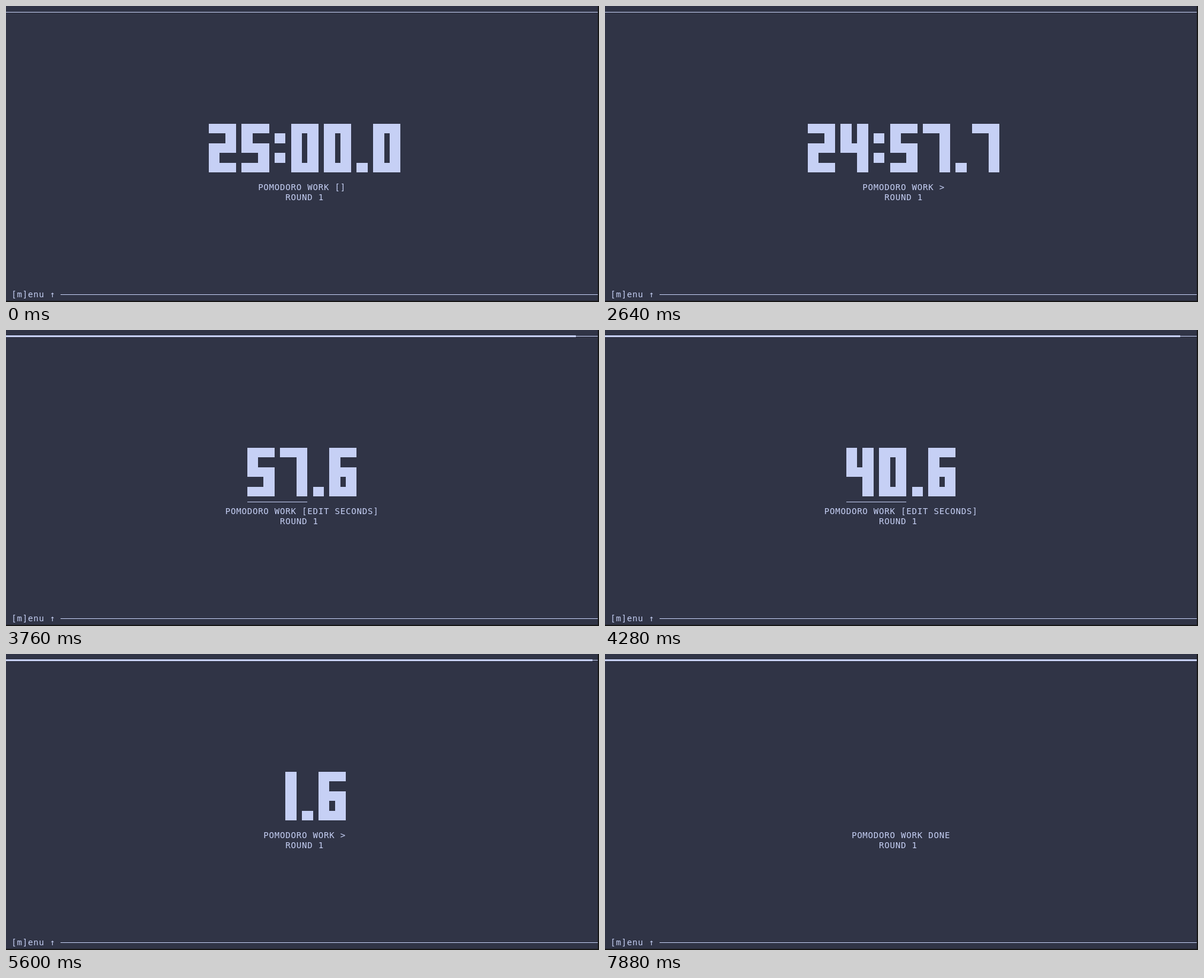
Animation of 1000 by 500 pixels, one loop 8 s. Source, as an HTML page:

```html
<!DOCTYPE html>
<html lang="en">
<head>
<meta charset="utf-8">
<title>Pomodoro timer</title>
<style>
  html, body { margin: 0; width: 100%; height: 100%; overflow: hidden; background: #171717; }
  svg { display: block; width: 100%; height: 100%; fill: #c6d0f5; }
  text { font: 14.1px "DejaVu Sans Mono", monospace; white-space: pre; }
</style>
</head>
<body>
<svg viewBox="0 0 1000 500">
  <rect width="998" height="498" fill="#303446"/>
  <rect y="10" width="998" height="1"/>
  <rect id="bar" y="9" height="3"/>
  <path id="digits" shape-rendering="crispEdges"/>
  <rect id="underline" y="290" height="1"/>
  <text id="status" y="311.3"></text>
  <text id="round" y="327.7"></text>
  <text id="menu" y="492"></text>
  <rect x="92" y="487" width="906" height="1"/>
</svg>
<script>
const LOOP = 8000, STEP = 40;
const COLS = 108, CELL = 9.242, ROW = 16.47, TOP = 199;
const TOTAL = 15000; // tenths of a second

// Five rows per glyph: Full, Left, Right, Both sides, Dot, blank
const GLYPHS = {
  0: 'FBBBF', 1: 'RRRRR', 2: 'FRFLF', 3: 'FRFRF', 4: 'BBFRR',
  5: 'FLFRF', 6: 'FLFBF', 7: 'FRRRR', 8: 'FBFBF', 9: 'FBFRF',
  ':': ' D D ', '.': '    D'
};
const SPANS = { F: [[0, 5]], L: [[0, 2]], R: [[3, 5]], B: [[0, 2], [3, 5]], D: [[0, 2]], ' ': [] };

const el = id => document.getElementById(id);
const px = col => Math.round(col * CELL);
const py = row => Math.round(TOP + row * ROW);
const glyphWidth = ch => ch === ':' || ch === '.' ? 2 : 5;
const clockWidth = str => [...str].reduce((sum, ch) => sum + glyphWidth(ch) + 1, -1);
const ticks = (t, start, period) => t < start ? 0 : 1 + Math.floor((t - start) / period);

function setText(id, str, col) {
  el(id).textContent = str;
  el(id).setAttribute('x', [...str].map((_, i) => ((col + i) * CELL).toFixed(2)).join(' '));
}

function setLine(id, from, to) {
  el(id).setAttribute('x', px(from));
  el(id).setAttribute('width', px(to) - px(from));
}

function clockPath(str, col) {
  let d = '';
  for (const ch of str) {
    [...GLYPHS[ch]].forEach((code, row) => {
      for (const [a, b] of SPANS[code])
        d += `M${px(col + a)} ${py(row)}H${px(col + b)}V${py(row + 1)}H${px(col + a)}Z`;
    });
    col += glyphWidth(ch) + 1;
  }
  return d;
}

function format(tenths) {
  const min = Math.floor(tenths / 600), sec = Math.floor(tenths / 10) % 60;
  const head = min ? min + ':' + String(sec).padStart(2, '0') : String(sec);
  return head + '.' + tenths % 10;
}

function stateAt(t) {
  if (t < 2800) {
    const n = t < 1760 ? ticks(t, 480, 100) : 13 + ticks(t, 1760, 96);
    return { left: TOTAL - Math.min(n, 24), mode: t < 480 ? '[]' : '>' };
  }
  if (t < 5600) {
    // Held key: 24 minutes down, then 56 seconds down
    const n = Math.min(ticks(t, 3040, 30.8), 80), mins = Math.min(n, 24);
    return {
      left: TOTAL - 24 - mins * 600 - (n - mins) * 10,
      mode: mins < 24 ? '[EDIT MINUTES]' : '[EDIT SECONDS]',
      edit: true
    };
  }
  const left = Math.max(0, 16 - ticks(t, 5640, 97));
  return { left, mode: left ? '>' : 'DONE', hidden: !left && (t < 7480 || t >= 7880) };
}

function draw(t) {
  const { left, mode, edit, hidden } = stateAt(t);
  const clock = format(left), label = 'POMODORO WORK ' + mode, round = 'ROUND 1';
  const width = clockWidth(clock), box = Math.max(width, label.length);
  const col = Math.ceil((COLS - box) / 2);
  const clockCol = col + Math.ceil((box - width) / 2);
  const textCol = str => col + Math.floor((box - str.length) / 2);

  el('digits').setAttribute('d', hidden ? '' : clockPath(clock, clockCol));
  setLine('underline', clockCol, edit ? clockCol + clockWidth(clock.split(/[:.]/)[0]) : clockCol);
  setText('status', label, textCol(label));
  setText('round', round, textCol(round));
  const percent = Math.floor((TOTAL - left) * 100 / TOTAL);
  setLine('bar', 0, Math.round(COLS * percent / 100));
}

let shown = -1;
function frame() {
  const t = Math.floor(performance.now() % LOOP / STEP) * STEP;
  if (t !== shown) draw(shown = t);
  requestAnimationFrame(frame);
}

setText('menu', '[m]enu ↑', 1);
frame();
</script>
</body>
</html>
```
